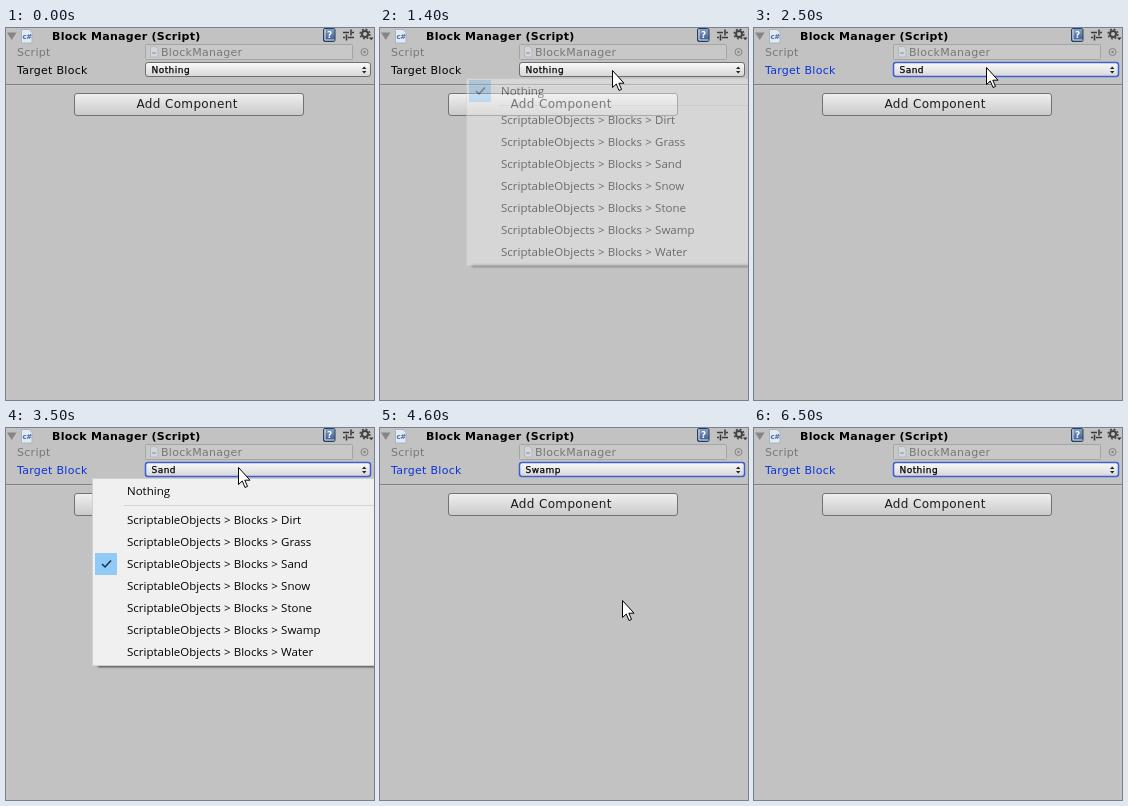
An HTML page that plays this animation: 368 px wide and 372 px high, repeating every 7100 ms.

```html
<!DOCTYPE html>
<html lang="en">
<head>
<meta charset="utf-8">
<title>Block Manager inspector</title>
<style>
html, body { margin: 0; width: 100%; height: 100%; overflow: hidden; background: #c2c2c2; }
svg { display: block; width: 368px; height: 372px; }
text { font: 11px "DejaVu Sans", sans-serif; letter-spacing: .28px; white-space: pre; }
.title { font-weight: bold; }
.dim { fill: #777; }
.value { font-size: 9px; letter-spacing: .45px; stroke: #000; stroke-width: .25px; }
.button { font-size: 12px; letter-spacing: .35px; fill: #1c1c1c; }
.menu text { font: 11.5px "Open Sans", "Noto Sans", sans-serif; letter-spacing: 0; word-spacing: .25px; }

/* One loop is 7.1 s; the picture moves on every 100 ms. */
.label, .focus, .nothing, .sand, .swamp, .menu, .shade, .check, .hover, .cursor {
  animation: 7.1s step-end infinite;
}
.label { animation-name: label; }
.focus { animation-name: focus; }
.nothing { animation-name: nothing; }
.sand { animation-name: sand; }
.swamp { animation-name: swamp; }
.menu, .shade { animation-name: menu; }
.check { animation-name: check; }
.hover { animation-name: hover; }
.cursor { animation-name: cursor; }

@keyframes label { 0% { fill: #000; } 32.39%, 100% { fill: #0a35d8; } }
@keyframes focus {
  0% { stroke: #6e6e6e; stroke-width: 1px; }
  32.39%, 100% { stroke: #3f5fd0; stroke-width: 1.5px; }
}
@keyframes nothing { 0%, 88.73%, 100% { opacity: 1; } 32.39% { opacity: 0; } }
@keyframes sand { 0%, 59.15%, 100% { opacity: 0; } 32.39% { opacity: 1; } }
@keyframes swamp { 0%, 88.73%, 100% { opacity: 0; } 59.15% { opacity: 1; } }
@keyframes menu {
  0%, 32.39%, 59.15%, 88.73%, 100% { opacity: 0; }
  19.71%, 30.98%, 46.47%, 57.74%, 74.64%, 87.32% { opacity: .45; }
  21.12%, 47.88%, 76.05% { opacity: 1; }
}
@keyframes check {
  0% { transform: translateY(63px); }
  46.47% { transform: translateY(136px); }
  74.64%, 100% { transform: translateY(202px); }
}
@keyframes hover {
  0%, 25.35%, 32.39%, 59.15%, 88.73%, 100% { transform: translateY(-40px); }
  23.94%, 50.70%, 81.69% { transform: translateY(63px); }
  26.76% { transform: translateY(92px); }
  28.16%, 52.11% { transform: translateY(114px); }
  29.57%, 53.52% { transform: translateY(136px); }
  54.92% { transform: translateY(180px); }
  56.33% { transform: translateY(202px); }
}
@keyframes cursor {
  0% { transform: translate(270px, 400px); }
  7.04% { transform: translate(270px, 400px); animation-timing-function: steps(6, start); }
  15.49% { transform: translate(228px, 51px); }
  16.90% { transform: translate(232px, 42px); }
  23.94% { transform: translate(232px, 42px); animation-timing-function: steps(5, start); }
  30.98% { transform: translate(236px, 137px); }
  32.39% { transform: translate(236px, 137px); animation-timing-function: steps(3, start); }
  36.61% { transform: translate(232px, 39px); }
  50.70% { transform: translate(232px, 39px); animation-timing-function: steps(5, start); }
  57.74% { transform: translate(242px, 202px); }
  61.97% { transform: translate(242px, 202px); animation-timing-function: steps(3, start); }
  66.19% { transform: translate(242px, 172px); animation-timing-function: steps(2, start); }
  69.01% { transform: translate(242px, 148px); animation-timing-function: steps(3, start); }
  73.23% { transform: translate(218px, 43px); }
  81.69% { transform: translate(218px, 43px); animation-timing-function: steps(3, start); }
  85.91% { transform: translate(220px, 63px); }
  87.32% { transform: translate(220px, 63px); animation-timing-function: steps(4, start); }
  92.95%, 100% { transform: translate(374px, 84px); }
}
</style>
</head>
<body>
<svg viewBox="0 0 368 372">
  <defs>
    <linearGradient id="popup" x2="0" y2="1"><stop stop-color="#fafafa"/><stop offset="1" stop-color="#d6d6d6"/></linearGradient>
    <linearGradient id="push" x2="0" y2="1"><stop stop-color="#f0f0f0"/><stop offset="1" stop-color="#c9c9c9"/></linearGradient>
    <linearGradient id="book" x2="0" y2="1"><stop stop-color="#86a3cc"/><stop offset="1" stop-color="#35568a"/></linearGradient>
    <filter id="soft" x="-10%" y="-300%" width="120%" height="700%"><feGaussianBlur stdDeviation=".8"/></filter>
  </defs>
  <rect width="368" height="372" fill="#c2c2c2"/>

  <!-- header -->
  <path d="M1 4.500h9.500l-4.750 7.500z" fill="#858585"/>
  <path d="M15.500 1.500h7.500l3 3v10.500h-10.500z" fill="#e4eaf2" stroke="#a9b4c4"/>
  <text x="16.500" y="11" fill="#3c6ea8" style="font-size:7px;letter-spacing:-.5px;font-weight:bold">c#</text>
  <text class="title" x="46" y="12">Block Manager (Script)</text>
  <rect x="317.500" y=".5" width="11.500" height="13" rx="1.500" fill="url(#book)" stroke="#2a3e5e"/>
  <path d="M319 1.500v10.500h9.500" fill="none" stroke="#dfe6ef"/>
  <text x="321" y="10" fill="#fff" style="font-size:9px;letter-spacing:0;font-weight:bold">?</text>
  <path d="M337 4.500h6M346 4.500h2M337 9.500h2M342 9.500h6M345 1.500v6M340.500 6.500v6" fill="none" stroke="#3a3a3a" stroke-width="1.600"/>
  <g fill="none" stroke="#424242">
    <circle cx="359" cy="6" r="3" stroke-width="2"/>
    <circle cx="359" cy="6" r="4.800" stroke-width="1.600" stroke-dasharray="1.900 1.870"/>
  </g>
  <path d="M363 9.500h4.500l-2.250 2.800z" fill="#333"/>

  <!-- fields -->
  <text class="dim" x="11" y="28">Script</text>
  <rect x="139.500" y="16.500" width="207" height="15" rx="1" fill="#c8c8c8" stroke="#a5a5a5"/>
  <path d="M144.500 18.500h5l2.500 2.500v8h-7.500z" fill="#d3d6da" stroke="#b4b8be"/>
  <path d="M146 25h4" stroke="#a9b3c2" stroke-width="2"/>
  <text class="dim" x="155" y="28">BlockManager</text>
  <circle cx="358.500" cy="24" r="3.500" fill="none" stroke="#858585"/>
  <circle cx="358.500" cy="24" r="1.200" fill="#858585"/>
  <text class="label" x="11" y="46">Target Block</text>
  <rect class="focus" x="139.500" y="34.500" width="225" height="14" rx="2.500" fill="url(#popup)"/>
  <text class="value nothing" x="145.500" y="45">Nothing</text>
  <text class="value sand" x="145.500" y="45">Sand</text>
  <text class="value swamp" x="145.500" y="45">Swamp</text>
  <path d="M356 41h4.400l-2.200-2.600zM356 43h4.400l-2.200 2.600z" fill="#222"/>
  <path d="M0 56.500h368" stroke="#808080"/>
  <path d="M0 57.500h368" stroke="#cbcbcb"/>
  <rect x="68.500" y="65.500" width="229" height="22" rx="2.500" fill="url(#push)" stroke="#737373"/>
  <text class="button" x="130.500" y="80">Add Component</text>

  <!-- drop-down list -->
  <rect class="shade" x="92" y="236.500" width="290" height="2.500" fill="#000" fill-opacity=".7" filter="url(#soft)"/>
  <g class="menu">
    <rect x="86.500" y="50.500" width="290" height="187" fill="#f0f0f0" stroke="#d0d0d0"/>
    <path d="M118 77.500h250" stroke="#d4d4d4"/>
    <rect class="hover" x="89" y="-11" width="279" height="22" fill="#91c9f7"/>
    <g class="check">
      <rect x="89" y="-11" width="22" height="22" fill="#91c9f7"/>
      <path d="M96 0l3 3 6-6.500" fill="none" stroke="#16324a" stroke-width="1.500"/>
    </g>
    <text x="121" y="67">Nothing</text>
    <g id="items"></g>
  </g>

  <path class="cursor" d="M.5 .5V17.500l3.800-3.500 2.700 6.500 2.500-1.100-2.700-6.200h5.200z" fill="#fff" stroke="#000"/>
</svg>
<script>
const items = document.getElementById('items');
['Dirt', 'Grass', 'Sand', 'Snow', 'Stone', 'Swamp', 'Water'].forEach((name, i) => {
  const row = document.createElementNS('http://www.w3.org/2000/svg', 'text');
  row.setAttribute('x', 121);
  row.setAttribute('y', 96 + 22 * i);
  row.textContent = `ScriptableObjects > Blocks > ${name}`;
  items.append(row);
});
</script>
</body>
</html>
```
